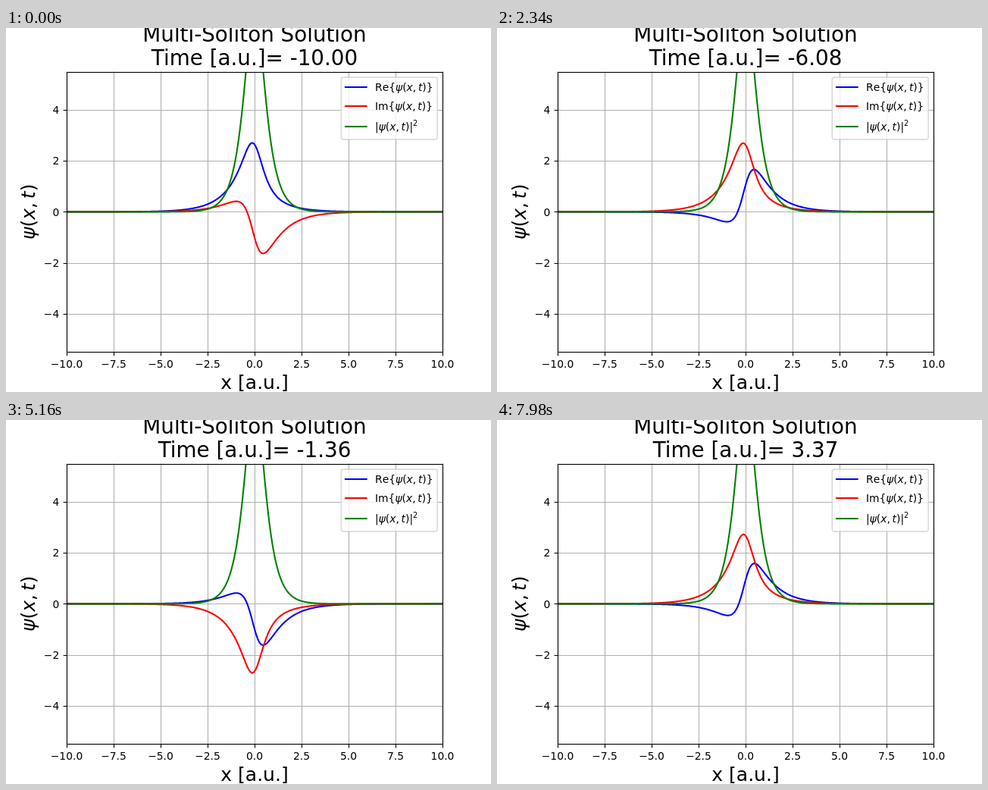
These frames come from a looping animation (640 by 480 pixels, 8 s). An HTML page with a canvas:

```html
<!DOCTYPE html>
<html lang="en">
<head>
<meta charset="utf-8">
<title>Multi-Soliton Solution</title>
<style>
  html, body { margin: 0; width: 100%; height: 100%; overflow: hidden; background: #fff; }
  canvas { display: block; }
</style>
</head>
<body>
<canvas id="plot" width="640" height="480"></canvas>
<script>
const ctx = document.getElementById('plot').getContext('2d');
const LOOP = 8000, STEP = 60;
const PT = 100 / 72;
const BOX = { left: 80, right: 576, top: 57.6, bottom: 427.2 };
const FAMILY = '"DejaVu Sans", Verdana, sans-serif';

const toX = x => 328 + x * 24.8;
const toY = y => 242.4 - y * 33.6;
const snap = v => Math.floor(v + 0.5 + 1e-6) + 0.5;

const xTicks = Array.from({ length: 9 }, (_, i) => -10 + 2.5 * i);
const yTicks = [-4, -2, 0, 2, 4];
const label = (v, digits) => v.toFixed(digits).replace('-', '\u2212');

// Envelope and spatial phase are stationary; only the global phase turns.
const amplitude = x => Math.sqrt(8 / Math.cosh(2 * x));
const phase = (x, t) => 2 * t + Math.atan(Math.exp(-2 * x));
const curves = [
  { color: '#0000ff', value: (x, t) => amplitude(x) * Math.cos(phase(x, t)) },
  { color: '#ff0000', value: (x, t) => amplitude(x) * Math.sin(phase(x, t)) },
  { color: '#008000', value: x => amplitude(x) ** 2 }
];

function line(x1, y1, x2, y2, color, width) {
  ctx.strokeStyle = color;
  ctx.lineWidth = width;
  ctx.beginPath();
  ctx.moveTo(x1, y1);
  ctx.lineTo(x2, y2);
  ctx.stroke();
}

function text(str, x, y, points, align = 'center') {
  ctx.font = `${points * PT}px ${FAMILY}`;
  ctx.textAlign = align;
  ctx.fillStyle = '#000';
  ctx.fillText(str, x, y);
}

// Math run: letters slanted, a small gap after commas, digits after ^ raised.
function mathRun(str, x, y, points, slanted = 'ψxt') {
  const size = points * PT;
  ctx.textAlign = 'left';
  ctx.fillStyle = '#000';
  let raised = false;
  for (const ch of str) {
    if (ch === '^') { raised = true; continue; }
    ctx.font = `${slanted.includes(ch) ? 'italic ' : ''}${size * (raised ? 0.7 : 1)}px ${FAMILY}`;
    ctx.fillText(ch, x, raised ? y - 0.4 * size : y);
    x += ctx.measureText(ch).width + (ch === ',' ? 0.195 * size : 0);
  }
}

function drawGrid() {
  for (const v of xTicks) {
    const x = snap(toX(v));
    line(x, BOX.top, x, BOX.bottom, '#b0b0b0', 0.8 * PT);
    line(x, 427.5, x, 432.4, '#000', 0.8 * PT);
    text(label(v, 1), toX(v), 448, 10);
  }
  for (const v of yTicks) {
    const y = snap(toY(v));
    line(BOX.left, y, BOX.right, y, '#b0b0b0', 0.8 * PT);
    line(75.6, y, 80.5, y, '#000', 0.8 * PT);
    text(label(v, 0), 70.3, Math.round(toY(v) + 5.2), 10, 'right');
  }
}

function drawCurves(t) {
  ctx.save();
  ctx.beginPath();
  ctx.rect(80, 58, 496, 369);
  ctx.clip();
  ctx.lineWidth = 1.5 * PT;
  ctx.lineJoin = 'round';
  for (const { color, value } of curves) {
    ctx.strokeStyle = color;
    ctx.beginPath();
    for (let i = 0; i <= 1000; i++) {
      const x = -10 + i / 50;
      ctx.lineTo(toX(x), toY(value(x, t)));
    }
    ctx.stroke();
  }
  ctx.restore();
}

function drawLegend() {
  ctx.beginPath();
  ctx.roundRect(442.3, 65, 126.9, 82, 2.8);
  ctx.fillStyle = 'rgba(255,255,255,0.8)';
  ctx.fill();
  ctx.strokeStyle = 'rgba(204,204,204,0.8)';
  ctx.lineWidth = PT;
  ctx.stroke();
  const rows = [['Re{ψ(x,t)}', 78], ['Im{ψ(x,t)}', 103], ['|ψ(x,t)|^2', 130]];
  rows.forEach(([str, y], i) => {
    line(446.9, y, 476.7, y, curves[i].color, 1.5 * PT);
    mathRun(str, 487, y + 5, 10);
  });
}

function draw(t) {
  ctx.fillStyle = '#fff';
  ctx.fillRect(0, 0, 640, 480);
  drawGrid();
  drawCurves(t);
  ctx.strokeStyle = '#000';
  ctx.lineWidth = 0.8 * PT;
  ctx.strokeRect(80.5, 58.5, 496, 369);
  drawLegend();

  text('Multi-Soliton Solution', 328, 18, 20);
  text(`Time [a.u.]= ${t.toFixed(2)}`, 328, 49, 20);
  text('x [a.u.]', 328, 476, 18);
  ctx.save();
  ctx.translate(37.5, 279);
  ctx.rotate(-Math.PI / 2);
  mathRun('ψ(x,t)', 0, 0, 18);
  ctx.restore();
}

const start = performance.now();
let shown = -1;
function tick(now) {
  const step = Math.floor((Math.max(0, now - start) % LOOP) / STEP);
  if (step !== shown) {
    shown = step;
    draw(-10 + step * 20 / 199);
  }
  requestAnimationFrame(tick);
}
tick(start);
</script>
</body>
</html>
```
